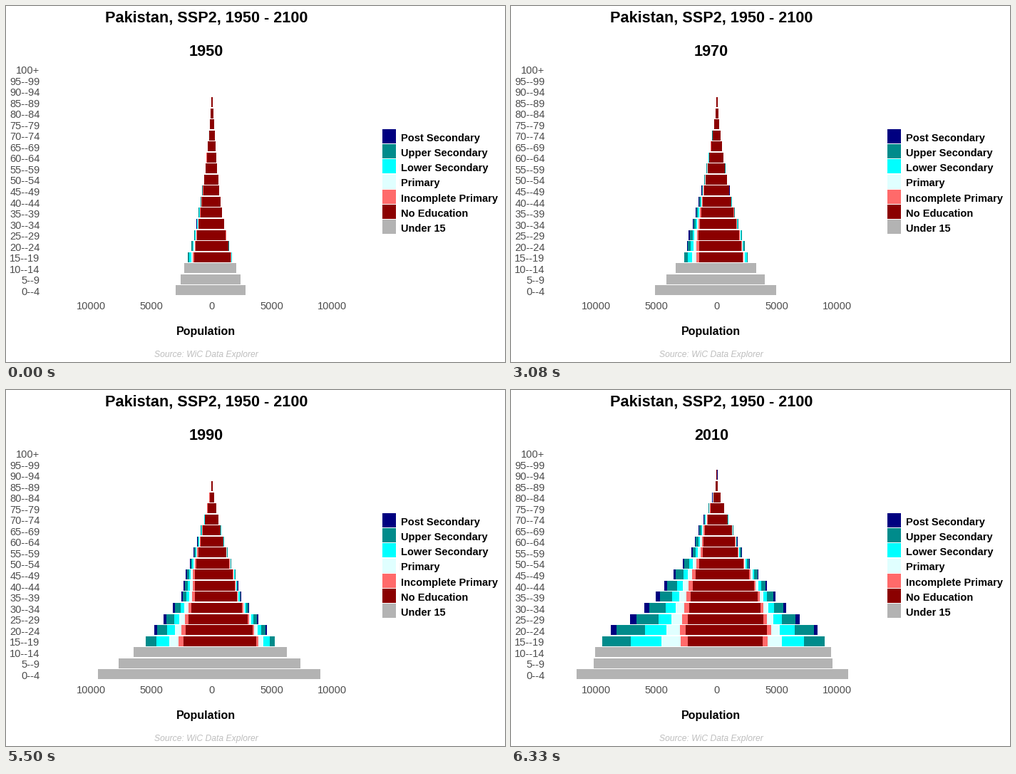
A matplotlib script that plays this animation: 700 px wide and 500 px high, repeating every 8000 ms.

```python
import numpy as np
import matplotlib.pyplot as plt
from matplotlib.animation import FuncAnimation
from matplotlib.collections import PolyCollection
from matplotlib.patches import Rectangle

W, H, DPI = 700, 500, 100
ZERO, UNIT = 289, 84.5 / 5000      # pixel of x = 0, pixels per thousand people
ROWS, PITCH, BASE, HALF = 21, 15.55, 399.32, 7
LOOP, STEP = 8000, 25              # ms
TICK = 1000 / 24                   # the motion advances at 24 steps per second
MOVE, PERIOD, LEAD = 21, 60, 11    # in ticks

CATEGORIES = [
    ("Under 15", "#B3B3B3"),
    ("No Education", "#8B0000"),
    ("Incomplete Primary", "#FF6A6A"),
    ("Primary", "#E0FFFF"),
    ("Lower Secondary", "#00FFFF"),
    ("Upper Secondary", "#008B8B"),
    ("Post Secondary", "#000080"),
]
YEARS = [1950, 1970, 1990, 2010]
SHIFT = 4                          # age rows a cohort climbs in 20 years
AGE = np.arange(ROWS)

# Men in the four youngest rows (pixels), women per man among them,
# survival of adults and extra survival of the newborn over 20 years.
PERIODS = [
    ([86, 70, 57, 45], 0.95, 0.885, 0.93),
    ([160, 131, 110, 93], 0.95, 0.97, 0.97),
    ([197, 173, 171, 161], 0.935, 0.93, 1),
]

# Share without education by birth cohort, in 5-year steps around 1950.
COHORTS = [-12, -5, -3, 0, 3, 5, 7, 9]
NO_SCHOOL = [
    [0.97, 0.83, 0.75, 0.60, 0.485, 0.43, 0.336, 0.255],
    [1, 0.96, 0.92, 0.87, 0.77, 0.70, 0.564, 0.425],
]

# Mix of the five school levels in old and new cohorts, and how far
# those of 15--19 and 20--24 have got.
OLD_MIX = np.array([0.20, 0.23, 0.18, 0.27, 0.12])
NEW_MIX = np.array([0.08, 0.18, 0.23, 0.40, 0.11])
UNFINISHED = {3: [1, 1.2, 1.5, 0.8, 0], 4: [1, 1, 1.25, 0.95, 0.7]}


def first_pyramid(base, decay, power):
    return base * decay ** AGE * np.clip(1 - (AGE / 18) ** power, 0, 1)


def grow(total, young, survival, infant):
    """Let every cohort age 20 years and fill in the new ones below."""
    alive = survival * np.clip(1 - (AGE / 13.5) ** 3.5, 0.06, 1)
    alive[0] *= infant
    return np.concatenate([young, (total * alive)[:-SHIFT]])


def split(total, year, no_school):
    """Outer edge of every category per age row, in pixels from the centre."""
    cohort = (year - 1950) / 5 - AGE
    none = total * np.interp(cohort, COHORTS, no_school)
    new = np.clip(cohort / 8, 0, 1)[:, None]
    mix = OLD_MIX * (1 - new) + NEW_MIX * new
    for row, factor in UNFINISHED.items():
        mix[row] *= factor
    mix /= mix.sum(axis=1, keepdims=True)
    levels = none[:, None] + (total - none)[:, None] * np.cumsum(mix, axis=1)
    edges = np.column_stack([np.zeros(ROWS), none, levels])
    edges[:3] = total[:3, None]
    return edges


def history():
    sides = [first_pyramid(51, 0.87, 4), first_pyramid(47, 0.845, 8)]
    states = []
    for year, period in zip(YEARS, [None] + PERIODS):
        if period:
            young, ratio, survival, infant = period
            sides = [grow(total, np.array(young) * scale, survival, infant)
                     for total, scale in zip(sides, (1, ratio))]
        states.append([split(total, year, share)
                       for total, share in zip(sides, NO_SCHOOL)])
    return np.array(states)


STATES = history()

plt.rcParams["font.family"] = "Liberation Sans"
fig = plt.figure(figsize=(W / DPI, H / DPI), dpi=DPI, facecolor="white")
ax = fig.add_axes([0, 0, 1, 1])
ax.set_xlim(0, W)
ax.set_ylim(H, 0)
ax.axis("off")


def label(x, y, text, px, **style):
    return ax.text(x, y, text, fontsize=px * 72 / DPI, va="baseline", **style)


label(281, 23, "Pakistan, SSP2, 1950 - 2100", 21.7, ha="center", weight="bold")
year_text = label(281, 70, "", 21.7, ha="center", weight="bold")
label(280.5, 462, "Population", 16, ha="center", weight="bold")
label(281, 493, "Source: WiC Data Explorer", 12.1, ha="center",
      style="italic", color="#BEBEBE")

for row in range(ROWS):
    name = f"{5 * row}--{5 * row + 4}" if row < ROWS - 1 else "100+"
    label(47.5, 406 - PITCH * row, name, 14.67, ha="right", color="#4D4D4D")
for value in range(-10000, 10001, 5000):
    label(ZERO - 0.5 + value * UNIT, 426, str(abs(value)), 14.67, ha="center",
          color="#4D4D4D")
for i, (name, color) in enumerate(reversed(CATEGORIES)):
    y = 173.15 + 21.15 * i
    ax.add_patch(Rectangle((528, round(y)), 19, 20, color=color, lw=0,
                           antialiased=False))
    label(554, y + 16.9, name, 14.67, weight="bold")

tops = np.round(BASE - HALF - PITCH * AGE)
bars = PolyCollection([], linewidths=0, edgecolors="none", antialiased=False,
                      facecolors=[c for _, c in CATEGORIES] * (2 * ROWS))
ax.add_collection(bars, autolim=False)


def quads(edges):
    """Corner points of all segments, ordered by side, row, category."""
    inner = np.concatenate([np.zeros((2, ROWS, 1)), edges[:, :, :-1]], axis=2)
    sign = np.array([-1, 1])[:, None, None]
    x0 = ZERO + sign * np.floor(inner + 0.5)
    x1 = ZERO + sign * np.floor(edges + 0.5)
    y0 = np.broadcast_to(tops[None, :, None], x0.shape)
    y1 = y0 + 2 * HALF
    corners = [(x0, y0), (x1, y0), (x1, y1), (x0, y1)]
    return np.stack([np.stack(c, -1) for c in corners], -2).reshape(-1, 4, 2)


def cubic_in_out(t):
    return 4 * t ** 3 if t < 0.5 else 1 - 4 * (1 - t) ** 3


def update(i):
    tick = int((i * STEP + 10) / TICK)
    stage, since = divmod(max(tick - LEAD, 0), PERIOD)
    t = min(since / MOVE, 1)
    nxt = min(stage + 1, len(YEARS) - 1)
    k = cubic_in_out(t)
    bars.set_verts(quads(STATES[stage] * (1 - k) + STATES[nxt] * k))
    year_text.set_text(str(YEARS[nxt if t > 0.5 else stage]))
    return bars, year_text


anim = FuncAnimation(fig, update, frames=LOOP // STEP, interval=STEP,
                     repeat=True, repeat_delay=0, blit=False)
plt.show()
```
